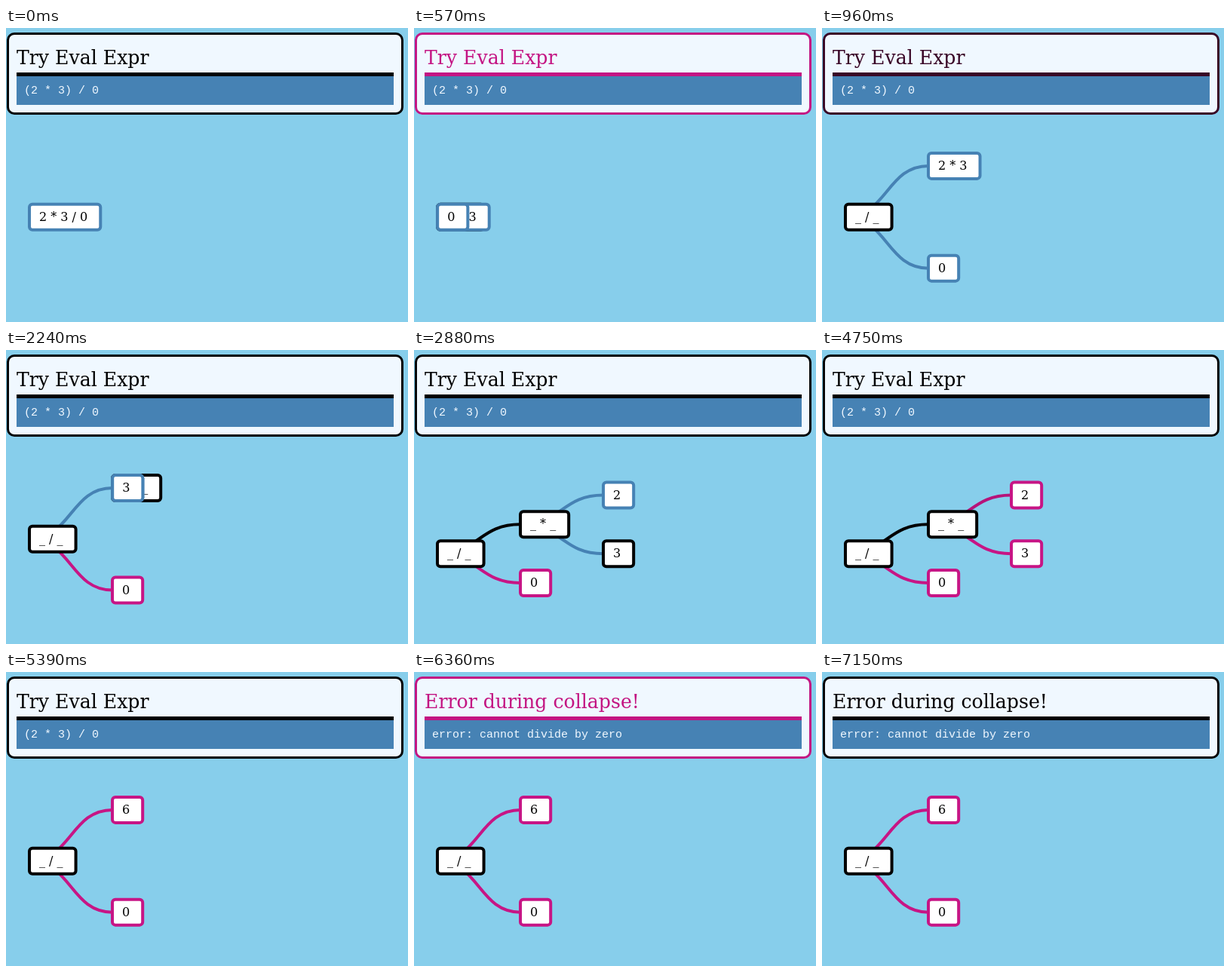
These frames come from a looping animation (533x390 px, 9810 ms). An HTML page:

```html
<!DOCTYPE html>
<html lang="en">
<head>
<meta charset="utf-8">
<title>Expression tree</title>
<style>
  html, body { margin: 0; width: 100%; height: 100%; overflow: hidden; background: #87ceeb; }
  svg { display: block; }
  #tree { font: 16px "DejaVu Serif", serif; }
  #tree path { fill: none; stroke-width: 4; }
  #tree rect { fill: #fff; stroke-width: 4; }
  #title { font: 25.2px "DejaVu Serif", serif; }
  #code { font: 15px "Liberation Mono", monospace; fill: #f0f8ff; }
</style>
</head>
<body>
<svg width="533" height="390" viewBox="0 0 533 390">
  <g id="tree"></g>
  <g id="head">
    <rect x="2.5" y="7.5" width="523" height="106" rx="8.5" fill="#f0f8ff" stroke="currentColor" stroke-width="3"/>
    <text id="title" x="14" y="48" fill="currentColor"></text>
    <rect x="14" y="59" width="500" height="5" fill="currentColor"/>
    <rect x="14" y="64" width="500" height="38" fill="#4682b4"/>
    <text id="code" x="24" y="87"></text>
  </g>
</svg>
<script>
const LOOP = 9810, MOVE = 250;
const BLUE = [70, 130, 180], BLACK = [0, 0, 0], PINK = [199, 21, 133];
const EXPAND = 570, EXPAND2 = 2240, COLLAPSE = 5140, ERROR = 5730;

// poses: [time, depth, height fraction]; looks: [time, label, colour]
const root = {
  poses: [[0, 0, 1/2], [EXPAND2, 0, 4/7], [COLLAPSE, 0, 1/2]],
  looks: [[0, '2 * 3 / 0', BLUE], [EXPAND, '_ / _', BLACK]]
};
const product = {
  parent: root,
  poses: [[EXPAND, 0, 1/2], [EXPAND, 1, 1/4], [EXPAND2, 1, 3/7], [COLLAPSE, 1, 1/4]],
  looks: [[EXPAND, '2 * 3', BLUE], [EXPAND2, '_ * _', BLACK], [COLLAPSE, '6', PINK]]
};
const zero = {
  parent: root,
  poses: [[EXPAND, 0, 1/2], [EXPAND, 1, 3/4], [EXPAND2, 1, 5/7], [COLLAPSE, 1, 3/4]],
  looks: [[EXPAND, '0', BLUE], [1150, '0', BLACK], [1670, '0', PINK]]
};
const factor = (label, y, open, done) => ({
  parent: product,
  end: COLLAPSE + MOVE,
  poses: [[EXPAND2, 1, 1/4], [EXPAND2, 2, y], [COLLAPSE, 1, 1/4]],
  looks: [[EXPAND2, label, BLUE], [open, label, BLACK], [done, label, PINK]]
});
const nodes = [root, product, zero, factor('2', 2/7, 4030, 4590), factor('3', 4/7, 2880, 3450)];

const $ = id => document.getElementById(id);
const pen = document.createElement('canvas').getContext('2d');
pen.font = '16px "DejaVu Serif", serif';

const mix = (a, b, p) => a + (b - a) * p;
const rgb = (a, b, p) => `rgb(${a.map((v, i) => Math.round(mix(v, b[i], p)))})`;

// cubic-bezier(.25, .1, .25, 1)
function ease(x) {
  if (x <= 0) return 0;
  if (x >= 1) return 1;
  let lo = 0, hi = 1, s;
  for (let i = 0; i < 20; i++) {
    s = (lo + hi) / 2;
    if (.75 * s * (1 - s) + s ** 3 < x) lo = s; else hi = s;
  }
  return .3 * s * (1 - s) ** 2 + 3 * s * s * (1 - s) + s ** 3;
}

// Current key, the one before it, and eased progress between them
function span(keys, t) {
  const i = keys.findLastIndex(k => k[0] <= t);
  return [keys[i], keys[Math.max(i - 1, 0)], ease((t - keys[i][0]) / MOVE)];
}

function place(node, t) {
  const [to, from, p] = span(node.poses, t);
  return [31 + 110 * mix(from[1], to[1], p), 115 + 271.5 * mix(from[2], to[2], p)];
}

function link(node, t) {
  const [x0, y0] = place(node.parent, t), [x1, y1] = place(node, t);
  const [to, from, p] = span(node.looks, t), mid = (x0 + x1) / 2;
  return `<path d="M${x0} ${y0}C${mid} ${y0} ${mid} ${y1} ${x1} ${y1}" stroke="${rgb(from[2], to[2], p)}"/>`;
}

function box(node, t) {
  const [x, y] = place(node, t), [[, label, color]] = span(node.looks, t);
  const w = pen.measureText(label).width + 30;
  return `<rect x="${x}" y="${y - 17}" width="${w}" height="34" rx="4" stroke="${rgb(color, color, 0)}"/>` +
    `<text x="${x + 13}" y="${y + 5}">${label}</text>`;
}

// Header colour swells to pink, then fades back
const flash = t => ease((t - 45) / 495) - ease((t - 540) / 1000);

function draw(t) {
  const live = nodes.filter(n => t >= n.poses[0][0] && t < (n.end || LOOP));
  $('tree').innerHTML = live.filter(n => n.parent).map(n => link(n, t)).join('') +
    live.map(n => box(n, t)).join('');
  const failed = t >= ERROR;
  $('title').textContent = failed ? 'Error during collapse!' : 'Try Eval Expr';
  $('code').textContent = failed ? 'error: cannot divide by zero' : '(2 * 3) / 0';
  $('head').style.color = rgb(BLACK, PINK, flash(failed ? t - 5785 : t));
}

const start = performance.now();
function tick() {
  draw((performance.now() - start) % LOOP);
  requestAnimationFrame(tick);
}
tick();
</script>
</body>
</html>
```
